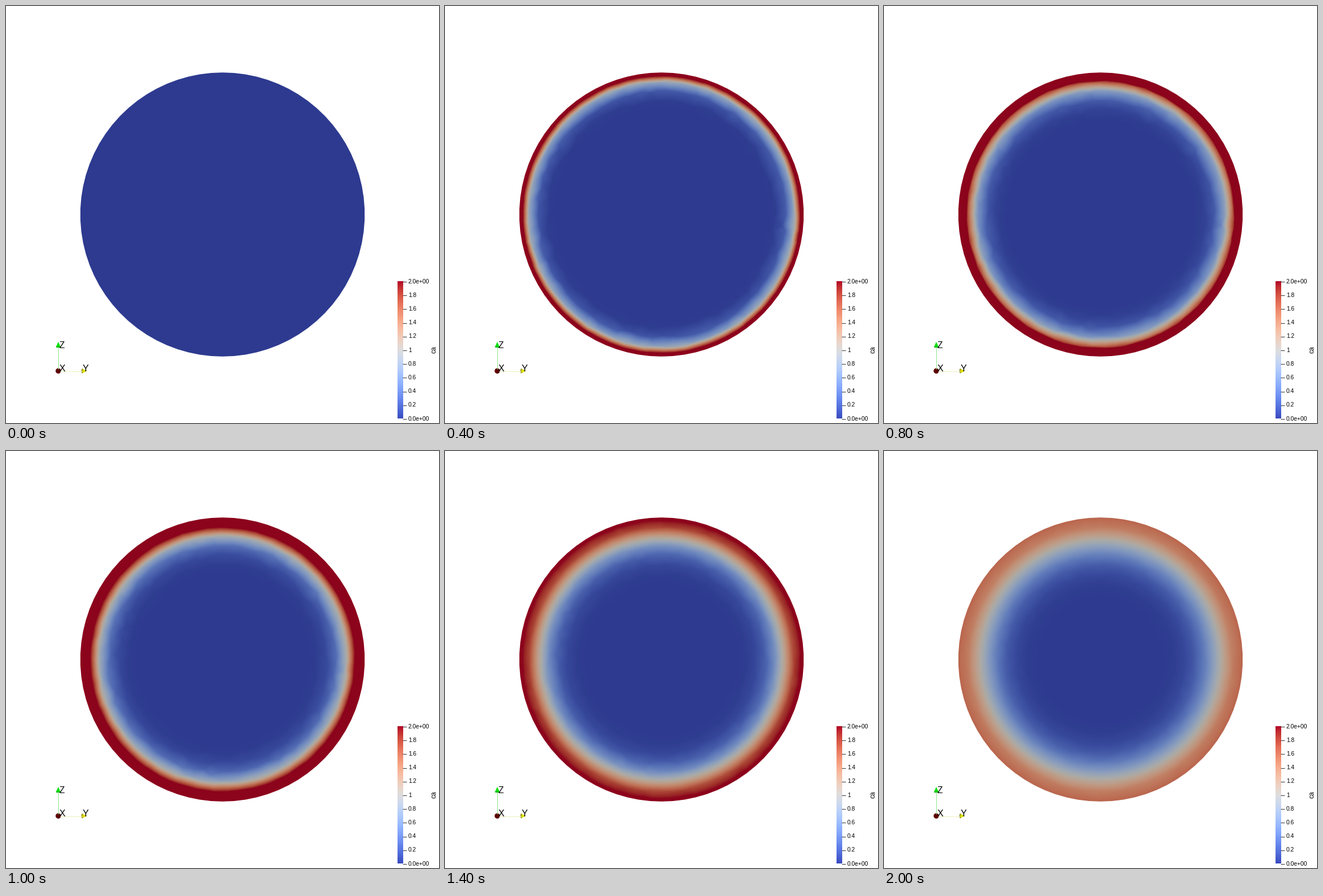
These frames come from a looping animation (762 by 735 pixels, 2200 ms). A matplotlib script:

```python
import math

import numpy as np
import matplotlib.pyplot as plt
from matplotlib.animation import FuncAnimation
from matplotlib.colors import ListedColormap
from matplotlib.patches import Circle, Ellipse, Polygon
from matplotlib.tri import LinearTriInterpolator, Triangulation

W, H, DPI = 762, 735, 100
CX, CY, R = 381, 367.5, 250.3
SIDES = 78
FRAMES, INTERVAL = 11, 200
FONT = "Liberation Sans"

# Diffusion from the rim, in pixels and animation steps
FLUX, DIFFUSIVITY, SHUTOFF = 17.8, 111, 4.6
CELL = 17

erfc = np.vectorize(math.erfc)


def inflow(depth, t):
    """Concentration after a constant rim flux has run for time t."""
    if t <= 0:
        return np.zeros_like(depth)
    z = depth / math.sqrt(4 * DIFFUSIVITY * t)
    peak = 2 * math.sqrt(t / (math.pi * DIFFUSIVITY))
    return FLUX * (peak * np.exp(-z ** 2) - depth / DIFFUSIVITY * erfc(z))


def concentration(depth, t):
    return inflow(depth, t) - inflow(depth, t - SHUTOFF)


def polar(radius, angle):
    return CX + radius * np.sin(angle), CY - radius * np.cos(angle)


def make_mesh():
    """Irregular rings of nodes: a triangulation and each node's depth."""
    rng = np.random.default_rng(12)
    rim = 2 * np.pi * np.arange(SIDES) / SIDES
    angles, radii = [rim, rim], [np.full(SIDES, R + 12), np.full(SIDES, R)]
    for k in range(1, int(R / CELL)):
        r = R - k * CELL
        n = max(5, round(2 * np.pi * r / CELL))
        step = 2 * np.pi / n
        jitter = min(5, 1 + 1.2 * k)
        angles.append(step * (np.arange(n) + rng.uniform(-0.25, 0.25, n) + rng.random()))
        radii.append(r + rng.uniform(-jitter, jitter, n))
    radius = np.concatenate(radii)
    mesh = Triangulation(*polar(radius, np.concatenate(angles)))
    return mesh, np.maximum(R - radius, 0), np.column_stack(polar(R, rim))


X0, X1, Y0, Y1 = 129, 633, 115, 620
X, Y = np.meshgrid(np.arange(X0, X1) + 0.5, np.arange(Y0, Y1) + 0.5)
MESH, DEPTH, RIM = make_mesh()


def field(i):
    return LinearTriInterpolator(MESH, concentration(DEPTH, i))(X, Y).filled(0)


fields = [field(i) for i in range(FRAMES)]

fig = plt.figure(figsize=(W / DPI, H / DPI), dpi=DPI, facecolor="white")
ax = fig.add_axes([0, 0, 1, 1])
ax.axis("off")


def px(size):
    return size * 72 / DPI


def label(x, y, text, size, va="baseline", **kw):
    ax.text(x, y, text, fontsize=px(size), family=FONT, color="black", va=va, **kw)


def line(xs, ys, color):
    ax.plot(xs, ys, color=color, lw=px(1), solid_capstyle="butt")


def shape(patch, color):
    patch.set(color=color, lw=0)
    ax.add_patch(patch)


# Disc, lit slightly darker than the colour bar
coolwarm = plt.get_cmap("coolwarm")
rgb = coolwarm(np.linspace(0, 1, 256))[:, :3]
shaded = ListedColormap(rgb * [0.78, 0.77, 0.745])
disc = ax.imshow(fields[0], cmap=shaded, vmin=0, vmax=2, aspect="auto",
                 extent=(X0, X1, Y1, Y0), interpolation="nearest")
disc.set_clip_path(Polygon(RIM, transform=ax.transData))

# Colour bar
BAR_TOP, BAR_BOTTOM = 485, 727
ax.imshow(np.linspace(1, 0, 242)[:, None], cmap=coolwarm, vmin=0, vmax=1,
          aspect="auto", extent=(689, 699, BAR_BOTTOM, BAR_TOP),
          interpolation="nearest")
for k in range(11):
    y = BAR_BOTTOM + (BAR_TOP - BAR_BOTTOM) * k / 10
    text = f"{k / 5:.1e}" if k in (0, 10) else f"{k / 5:g}"
    line([698, 705], [round(y) + 0.5] * 2, "#333333")
    label(708, y + 3.6, text, 10.3)
label(759.5, 606, "ca", 12, va="center", ha="right", rotation=90)

# Orientation axes
line([91.5, 91.5], [640, 601], "#8ce68c")
line([95, 134], [643.5, 643.5], "#eeeebb")
shape(Polygon([(92, 592), (87.8, 601), (96.2, 601)]), "#0be00b")
shape(Ellipse((92, 601), 8.4, 2.6), "#0bbd0b")
shape(Polygon([(142.5, 643.2), (134, 639), (134, 647.4)]), "#e0e00b")
shape(Ellipse((134.3, 643.2), 3, 8.2), "#6e6e10")
shape(Ellipse((135, 643.2), 2.4, 6.4), "#d2d20b")
shape(Circle((92, 643.2), 4.7), "#5c0000")
label(93.2, 603.3, "Z", 15.5)
label(94, 643.5, "X", 16)
label(134.2, 643.5, "Y", 16)

ax.set_xlim(0, W)
ax.set_ylim(H, 0)


def draw(i):
    disc.set_data(fields[i])
    return [disc]


anim = FuncAnimation(fig, draw, frames=FRAMES, interval=INTERVAL, repeat=True)
plt.show()
```
